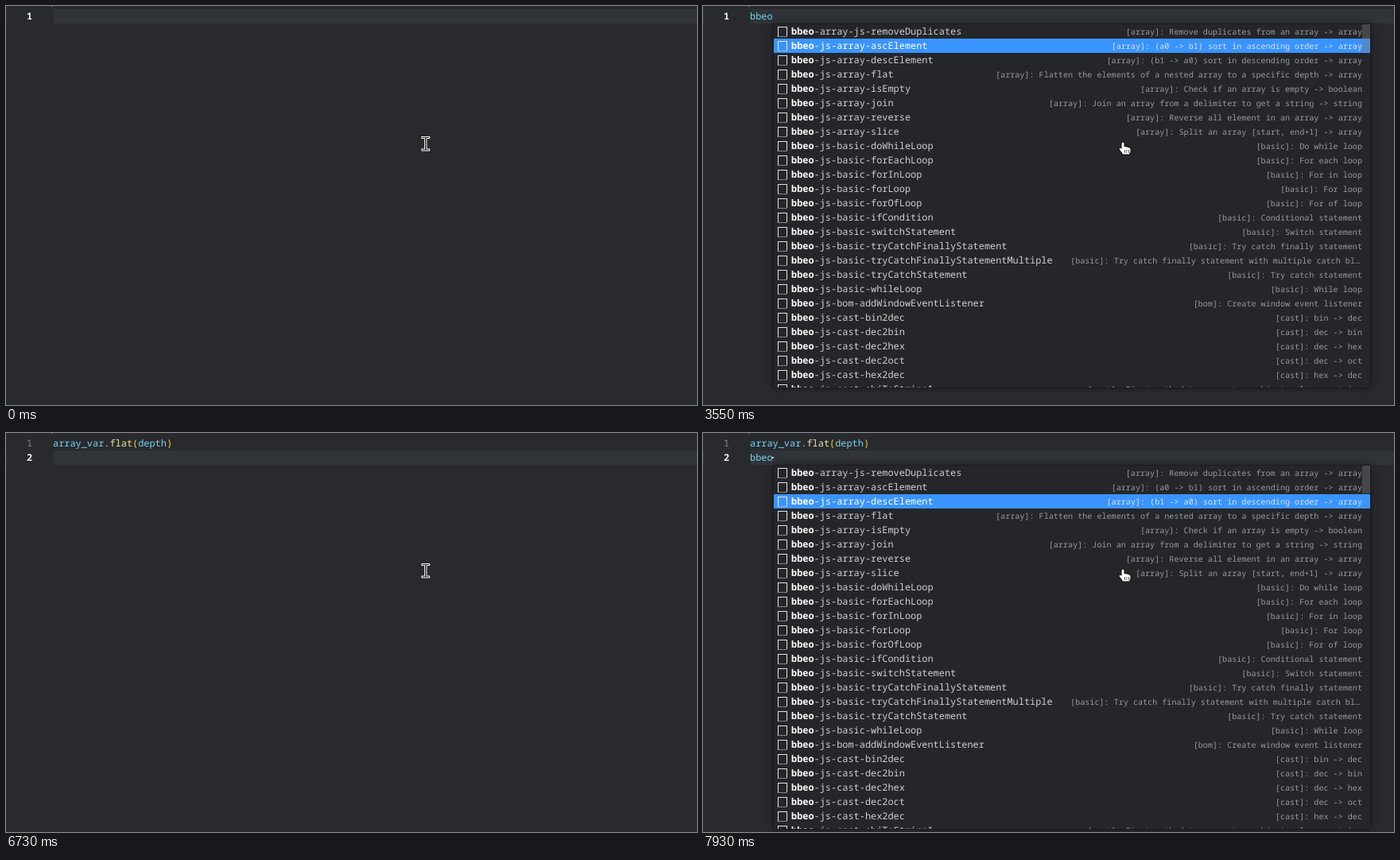
An HTML page with a canvas that plays this animation: 869 by 502 pixels, repeating every 8 s.

```html
<!DOCTYPE html>
<html lang="en">
<head>
<meta charset="utf-8">
<title>Snippet completion</title>
<style>
  html, body { margin: 0; width: 100%; height: 100%; overflow: hidden; background: #292a2e; }
  canvas { display: block; }
</style>
</head>
<body>
<canvas id="stage" width="869" height="502"></canvas>
<script>
const ctx = document.getElementById('stage').getContext('2d');
const LOOP = 8000, ROW = 18, TOP = 4, LEFT = 59, CHAR = 7.146;
const FAMILY = '"Noto Sans Mono", "DejaVu Sans Mono", monospace';
const SIZE = CHAR / 0.6, SMALL = SIZE * 0.85;
const CYAN = '#72d5ee', GOLD = '#ffd700';

const ITEMS = [
  ['array-js-removeDuplicates', '[array]: Remove duplicates from an array -> array'],
  ['js-array-ascElement', '[array]: (a0 -> b1) sort in ascending order -> array'],
  ['js-array-descElement', '[array]: (b1 -> a0) sort in descending order -> array'],
  ['js-array-flat', '[array]: Flatten the elements of a nested array to a specific depth -> array'],
  ['js-array-isEmpty', '[array]: Check if an array is empty -> boolean'],
  ['js-array-join', '[array]: Join an array from a delimiter to get a string -> string'],
  ['js-array-reverse', '[array]: Reverse all element in an array -> array'],
  ['js-array-slice', '[array]: Split an array [start, end+1] -> array'],
  ['js-basic-doWhileLoop', '[basic]: Do while loop'],
  ['js-basic-forEachLoop', '[basic]: For each loop'],
  ['js-basic-forInLoop', '[basic]: For in loop'],
  ['js-basic-forLoop', '[basic]: For loop'],
  ['js-basic-forOfLoop', '[basic]: For of loop'],
  ['js-basic-ifCondition', '[basic]: Conditional statement'],
  ['js-basic-switchStatement', '[basic]: Switch statement'],
  ['js-basic-tryCatchFinallyStatement', '[basic]: Try catch finally statement'],
  ['js-basic-tryCatchFinallyStatementMultiple', '[basic]: Try catch finally statement with multiple catch bl…'],
  ['js-basic-tryCatchStatement', '[basic]: Try catch statement'],
  ['js-basic-whileLoop', '[basic]: While loop'],
  ['js-bom-addWindowEventListener', '[bom]: Create window event listener'],
  ['js-cast-bin2dec', '[cast]: bin -> dec'],
  ['js-cast-dec2bin', '[cast]: dec -> bin'],
  ['js-cast-dec2hex', '[cast]: dec -> hex'],
  ['js-cast-dec2oct', '[cast]: dec -> oct'],
  ['js-cast-hex2dec', '[cast]: hex -> dec'],
  ['js-cast-objToString1', '[cast]: First method to convert an object value -> string']
];

const CODE = [['array_var', CYAN], ['.', '#d4d4d4'], ['flat', '#e6e7a0'],
              ['(', GOLD], ['depth', CYAN], [')', GOLD]];
const CODE_LEN = CODE.reduce((n, part) => n + part[0].length, 0);

// Timelines: [start, value]
const TYPED = [[0, ''], [980, 'b'], [1120, 'bb'], [1580, 'bbe'], [1660, 'bbeo'], [4600, ''],
               [6770, 'b'], [6860, 'bb'], [6980, 'bbe'], [7080, 'bbeo']];
const SELECTED = [[0, 0], [3330, 1], [3560, 2], [3800, 3], [4600, 0], [7810, 1], [7920, 2]];
const POPUP = [[0, false], [1220, true], [4600, false], [6930, true]];
const BLINK = [-1040, 980, 1120, 1580, 1660, 4680, 5450, 5760, 6770, 6860, 6980, 7090].map(t => [t, t]);
const ACCEPT = 4600, BULB = 4850, END_KEY = 5450, ENTER = 5650;

const at = (list, t) => list.filter(step => step[0] <= t).pop()[1];
const colX = n => LEFT + n * CHAR;
const lineY = n => TOP + n * ROW;

function rect(x, y, w, h, color) {
  ctx.fillStyle = color;
  ctx.fillRect(x, y, w, h);
}

function text(str, x, y, color, weight = 400, size = SIZE, align = 'left') {
  ctx.font = `${weight} ${size}px ${FAMILY}`;
  ctx.textAlign = align;
  ctx.fillStyle = color;
  ctx.fillText(str, x, y);
}

// Caret stays solid for half a second, then squashes and grows back
function caretScale(t) {
  const age = t - at(BLINK, t) - 500;
  if (age < 0) return 1;
  const p = age % 1000;
  const k = Math.min(1, Math.max(0, ((p < 500 ? p : 1000 - p) - 100) / 300));
  return 1 - k * k * (3 - 2 * k);
}

function drawCaret(col, line, t) {
  const h = ROW * caretScale(t);
  rect(Math.round(58.7 + col * 7.14), lineY(line) + (ROW - h) / 2, 2, h, '#d2d4d6');
}

function drawCode() {
  let col = 0;
  for (const [str, color] of CODE) {
    text(str, colX(col), TOP + 13, color, 500);
    col += str.length;
  }
}

function drawBulb() {
  ctx.fillStyle = '#ffcc00';
  ctx.beginPath();
  ctx.arc(217.4, 9.8, 4.7, 0, 7);
  ctx.fill();
  rect(215, 13, 5, 3, '#ffcc00');
  rect(215, 17, 5, 2, '#ffcc00');
}

function drawEditor(t, typed) {
  const done = t >= ACCEPT, line = t >= ENTER ? 1 : 0;
  const placing = done && t < END_KEY;
  rect(57, 0, 2, 1, '#66676a');
  rect(0, lineY(line), 1, ROW, '#35373b');
  if (!placing) rect(60, lineY(line), 809, ROW, '#303337');
  for (let i = 0; i <= line; i++) {
    const active = i === line;
    text(i + 1, 26, lineY(i) + 13, active ? '#f4f4f4' : '#85868a', active ? 600 : 400);
  }
  if (placing) {
    rect(colX(0), TOP, 9 * CHAR, ROW, '#3d4354');
    rect(colX(15), TOP, 5 * CHAR, ROW, '#3a3b40');
  }
  if (done) {
    drawCode();
    if (!line) {
      if (!placing) {
        ctx.strokeStyle = '#8a7d3c';
        ctx.lineWidth = 1;
        for (const x of [159.5, 202.5]) ctx.strokeRect(x, TOP + 0.5, 6.5, 17);
      }
      if (t >= BULB) drawBulb();
    }
  }
  text(typed, LEFT, lineY(line) + 13, CYAN, 500);
  drawCaret(placing ? 9 : done && !line ? CODE_LEN : typed.length, line, t);
}

function drawIcon(x, y) {
  rect(x, y, 12, 1, '#e2e2e2');
  rect(x, y, 1, 12, '#e2e2e2');
  rect(x + 11, y, 1, 12, '#e2e2e2');
  for (let i = 0; i < 12; i += 2) rect(x + i, y + 12, 1, 1, '#e2e2e2');
}

function drawPopup(typed, selected, line) {
  const n = typed.length, x = Math.round(colX(n)), y = lineY(line + 1);
  ctx.save();
  ctx.shadowColor = 'rgba(0,0,0,.4)';
  ctx.shadowBlur = 9;
  rect(x, y, 752, 459, '#1b1c1f');
  ctx.restore();
  ctx.save();
  ctx.beginPath();
  ctx.rect(x + 1, y + 1, 750, 457);
  ctx.clip();
  rect(x, y, 752, 459, '#25262a');
  ITEMS.forEach(([name, detail], i) => {
    const top = y + 1 + i * ROW, base = top + 13, on = i === selected;
    if (on) rect(x + 1, top, 750, ROW, '#3a94ff');
    drawIcon(x + 6, top + 3);
    const label = 'bbeo-' + name;
    text(label.slice(0, n), x + 23, base, '#ffffff', 700);
    text(label.slice(n), x + 23 + n * CHAR, base, on ? '#ffffff' : '#cfcfd0', on ? 500 : 400);
    const cut = detail.endsWith('…') ? 3 : 0;
    text(detail, x + 741 - cut, base, on ? '#d6e6fa' : '#98999b', 400, SMALL, 'right');
  });
  rect(x + 741, y + 1, 10, 27 + 2 * n, 'rgba(121,121,121,.4)');
  ctx.restore();
}

function drawBeam() {
  const beam = new Path2D('M524 165.5h2.5q1.2 0 1.2 1.5v12.500q0 1.500-1.2 1.500h-2.500M531.500 165.500h-2.500q-1.200 0-1.200 1.500v12.500q0 1.500 1.200 1.500h2.500');
  ctx.lineCap = 'square';
  for (const [w, color] of [[3.2, '#ffffff'], [1.2, '#16171a']]) {
    ctx.lineWidth = w;
    ctx.strokeStyle = color;
    ctx.stroke(beam);
  }
}

function drawHand() {
  const hand = new Path2D('M526.500 181v-8q0-1.500 1.500-1.500t1.500 1.500v4h1.500q1 0 1.500.6 2-.4 2.500.6 2.500-.2 2.500 2v3.300l-1.500 3h-8l-1.500-2.500-2.500-3q-1-1.500.3-2.200 1-.4 2.200 1.200z');
  ctx.lineJoin = 'round';
  ctx.lineWidth = 2;
  ctx.strokeStyle = '#08090a';
  ctx.stroke(hand);
  ctx.fillStyle = '#ffffff';
  ctx.fill(hand);
  for (const x of [530, 532.5, 535]) rect(x, 181, 0.8, 4, '#303236');
}

function draw(t) {
  const typed = at(TYPED, t), open = at(POPUP, t);
  rect(0, 0, 869, 502, '#292a2e');
  drawEditor(t, typed);
  if (open) drawPopup(typed, at(SELECTED, t), t >= ENTER ? 1 : 0);
  if (open && !(t > 4530 && t < ACCEPT)) drawHand();
  else drawBeam();
}

function tick() {
  draw(performance.now() % LOOP);
  requestAnimationFrame(tick);
}

ctx.textBaseline = 'alphabetic';
ctx.textRendering = 'geometricPrecision';
tick();
</script>
</body>
</html>
```
